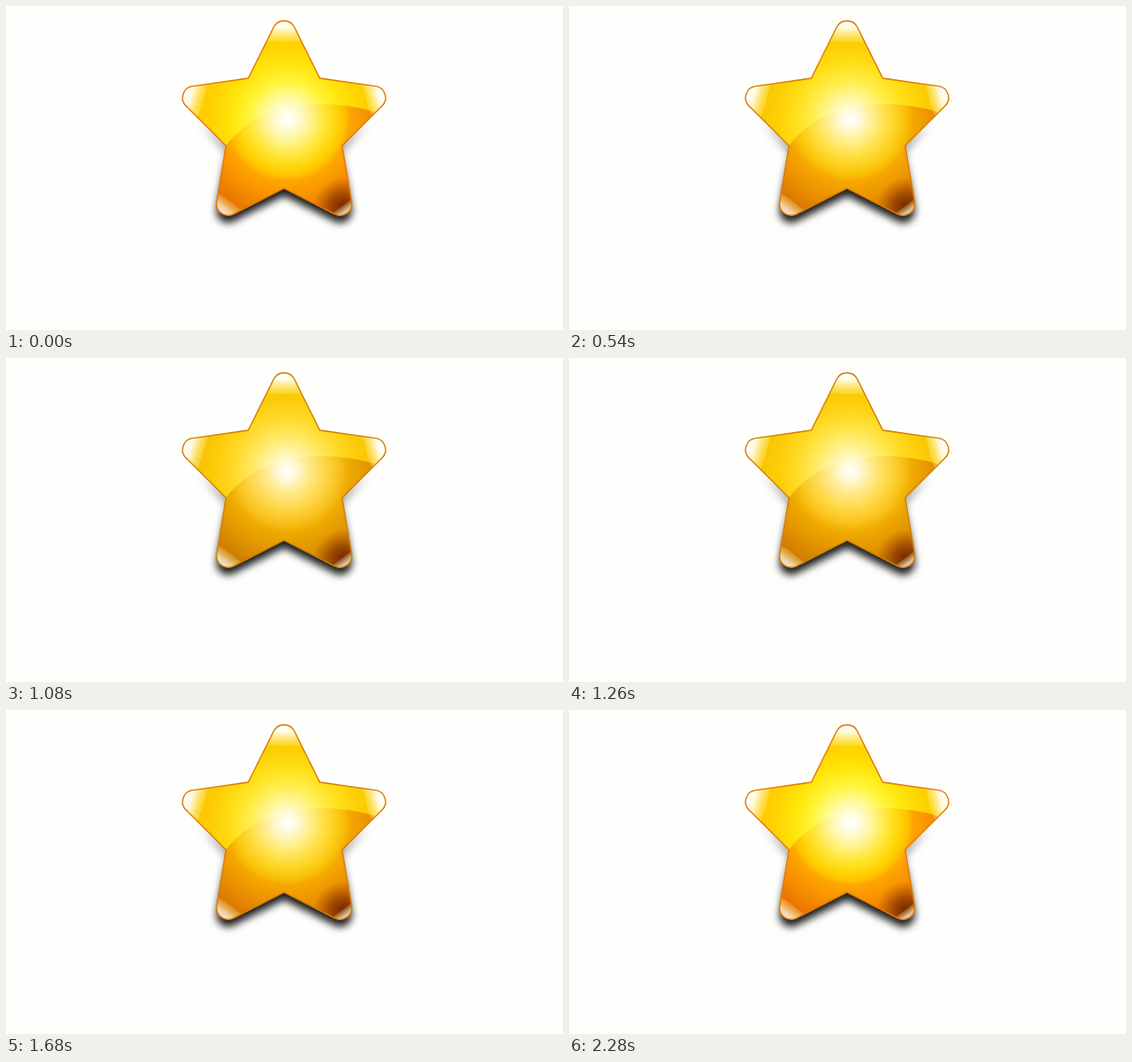
An HTML page with a canvas that plays this animation: 600x350 px, repeating every 2340 ms.

```html
<!DOCTYPE html>
<html>
<head>
<meta charset="utf-8">
<style>
html, body { margin: 0; height: 100%; overflow: hidden; background: #fefefc; }
canvas { display: block; }
</style>
</head>
<body>
<canvas id="stage" width="600" height="350"></canvas>
<script>
const ctx = document.getElementById('stage').getContext('2d');

const star = new Path2D(`M261 78 L288.3 23 A12.5 12.5 0 0 1 310.7 23 L338 78
  L398 86.6 A12.5 12.5 0 0 1 405 108 L362 151 L372.3 211.5 A12.5 12.5 0 0 1 354.2 224.8
  L299.5 197 L245 224.8 A12.5 12.5 0 0 1 227 211.5 L237 151 L194 108 A12.5 12.5 0 0 1 201.5 86.6 Z`);
const lower = new Path2D(`M228 164 Q243 138 270 121.5 Q296 109 325 106.5
  Q362 104 396 114 L420 240 L200 240 Z`);

// Stops: position, bright colour, muted colour
const upperStops = [
  [0, 'ffffff', 'ffffff'], [.08, 'fffde0', 'fffbe0'], [.2, 'fffa9a', 'fff29a'],
  [.34, 'fff53a', 'ffe65a'], [.5, 'ffe60a', 'ffd824'], [.66, 'ffd400', 'fccb08'],
  [.85, 'ffc600', 'f6c000'], [1, 'ffbc00', 'efb400']];
const lowerStops = [
  [0, 'ffffff', 'ffffff'], [.08, 'fffce0', 'fff9dc'], [.2, 'fff596', 'ffe98a'],
  [.34, 'ffe634', 'ffd648'], [.47, 'ffd000', 'f8c01c'], [.525, 'ffbe00', 'f2b208'],
  [.56, 'ffa600', 'edaa00'], [.72, 'f89000', 'e29600'], [.88, 'ea7800', 'd08000'],
  [1, 'dc6600', 'bd6c00']];

function mix(a, b, p) {
  const part = (s, i) => parseInt(s.substr(i, 2), 16);
  return 'rgb(' + [0, 2, 4].map(i =>
    Math.round(part(a, i) + (part(b, i) - part(a, i)) * p)) + ')';
}

function glow(stops, p) {
  const g = ctx.createRadialGradient(303, 122, 0, 303, 122, 120);
  for (const [at, a, b] of stops) g.addColorStop(at, mix(a, b, p));
  return g;
}

function shine(x, y, angle, length, strength) {
  const g = ctx.createLinearGradient(0, 0, length, 0);
  g.addColorStop(0, `rgba(255,255,255,${strength})`);
  g.addColorStop(.3, `rgba(255,255,240,${strength * .9})`);
  g.addColorStop(1, `rgba(255,245,150,${strength * .22})`);
  ctx.save();
  ctx.translate(x, y);
  ctx.rotate(angle * Math.PI / 180);
  ctx.fillStyle = g;
  ctx.beginPath();
  ctx.moveTo(-5, -30);
  ctx.lineTo(length - 2, -30);
  ctx.quadraticCurveTo(length + 2, 0, length - 2, 30);
  ctx.lineTo(-5, 30);
  ctx.fill();
  ctx.restore();
}

function drawShadow() {
  const fade = ctx.createLinearGradient(0, 118, 0, 190);
  fade.addColorStop(0, 'rgba(0,0,0,0)');
  fade.addColorStop(1, 'rgba(0,0,0,.9)');
  ctx.save();
  ctx.filter = 'blur(4px)';
  ctx.translate(0, 8);
  ctx.fillStyle = fade;
  ctx.fill(star);
  ctx.restore();
}

function draw(p) {
  ctx.fillStyle = '#fefefc';
  ctx.fillRect(0, 0, 600, 350);
  drawShadow();

  ctx.save();
  ctx.clip(star);
  ctx.fillStyle = glow(upperStops, p);
  ctx.fillRect(180, 10, 240, 230);
  ctx.fillStyle = glow(lowerStops, p);
  ctx.fill(lower);

  const dark = ctx.createRadialGradient(363, 217, 0, 363, 217, 32);
  dark.addColorStop(0, 'rgba(105,30,0,.9)');
  dark.addColorStop(.4, 'rgba(120,40,0,.65)');
  dark.addColorStop(1, 'rgba(150,60,0,0)');
  ctx.fillStyle = dark;
  ctx.fillRect(320, 180, 60, 50);

  shine(299.5, 18, 90, 21, 1);
  shine(192, 102, 17, 20, 1);
  shine(407, 102, 163, 18, 1);
  shine(231, 222, -54, 15, .8);
  shine(369, 222, -126, 9, .75);
  ctx.restore();

  ctx.strokeStyle = mix('e67800', 'd08000', p);
  ctx.lineWidth = 1.4;
  ctx.stroke(star);
}

const STEP = 60, STEPS = 39;
function tick(now) {
  const n = Math.floor(now / STEP) % STEPS;
  draw((Math.min(n, 37 - n) + 1) / 19);
  requestAnimationFrame(tick);
}
draw(1 / 19);
requestAnimationFrame(tick);
</script>
</body>
</html>
```
